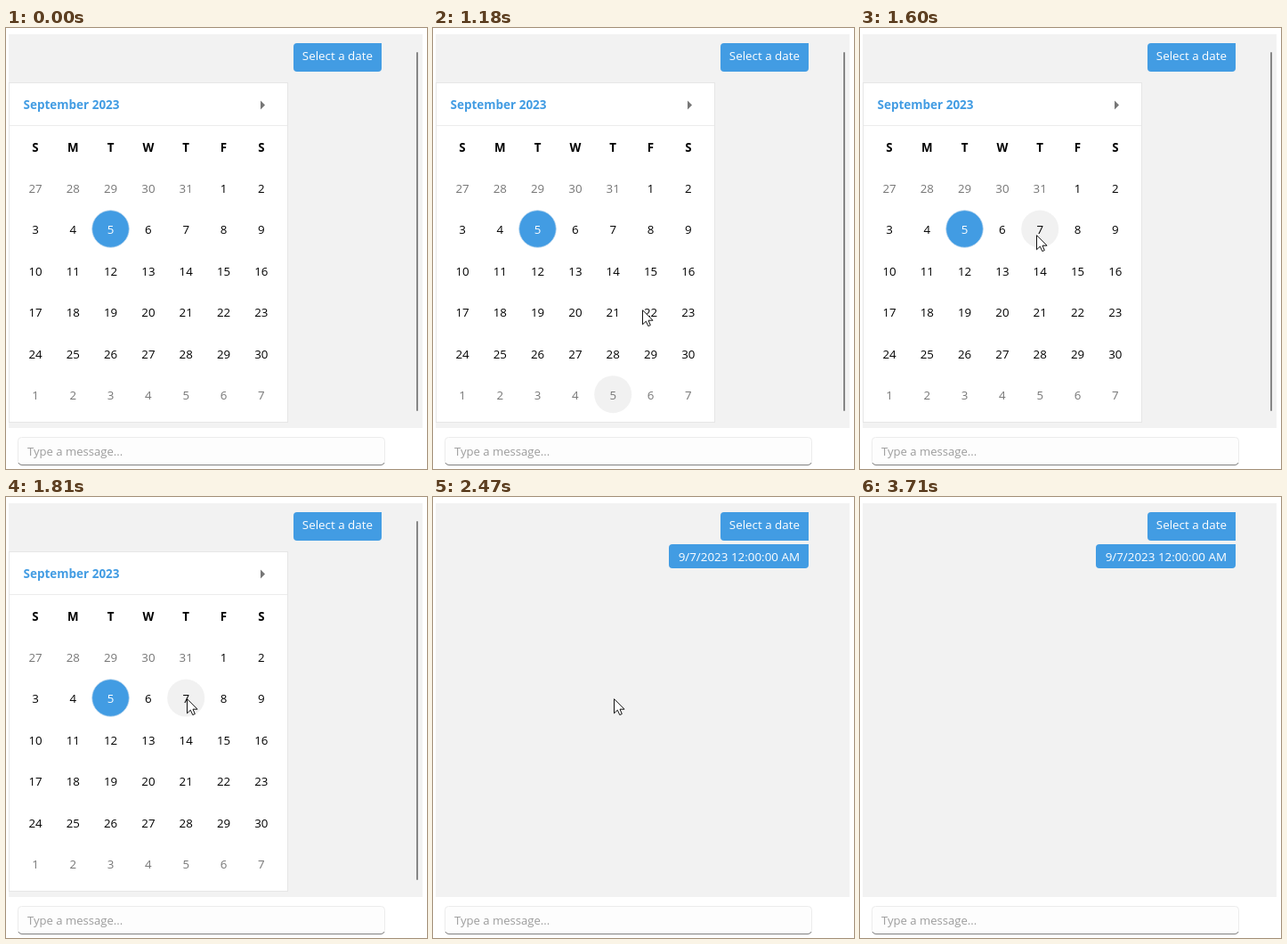
Recreate the animation shown at these times as an HTML page. Size 473 by 495 pixels, loop 5440 ms.

```html
<!DOCTYPE html>
<html lang="en">
<head>
<meta charset="utf-8">
<title>Date picker chat</title>
<style>
html, body { margin: 0; width: 100%; height: 100%; overflow: hidden; background: #fff; }
svg { display: block; width: 473px; height: 495px; }
text { font: 13.4px "Open Sans", "Noto Sans", sans-serif; white-space: pre; }
.bold { font-weight: 700; }
.day { font-size: 13.3px; text-anchor: middle; }
.bubble { fill: #429ce3; }
.said { fill: #fff; text-anchor: end; }
</style>
</head>
<body>
<svg viewBox="0 0 473 495">
  <rect x="3" y="7" width="465" height="442" fill="#f2f2f2"/>
  <path id="first" class="bubble"/>
  <text class="said" x="412" y="36">Select a date</text>

  <g id="picker">
    <rect x="461" y="27" width="2" height="403" rx="1" fill="#868686"/>
    <rect x="3.5" y="61.5" width="313" height="381" fill="#fff" stroke="#e6e6e6"/>
    <path d="M4 109.5H316" stroke="#ececec"/>
    <text class="bold" x="19.5" y="91" fill="#429ce3" style="font-size:13.5px">September 2023</text>
    <path d="M286 81.5L291 86.5L286 91.5Z" fill="#767676"/>
    <circle id="hover" r="21"/>
    <circle cx="117.5" cy="225.5" r="20.8" fill="#429ce3" stroke="#b5d3ec" stroke-width=".8"/>
    <g id="days"></g>
  </g>

  <g id="reply">
    <path id="second" class="bubble"/>
    <text class="said" x="412" y="72">9/7/2023 12:00:00 AM</text>
  </g>

  <rect id="field" x="13.5" y="459.5" width="412" height="31" rx="4" stroke="#ececec"/>
  <path d="M14 488Q15 490.5 18 490.5H421Q424 490.5 425 488" fill="none" stroke="#808080"/>
  <text id="hint" x="24" y="480" style="font-size:13.1px">Type a message...</text>

  <path id="arrow" d="M.5 .7V16.8L4.3 13.2L6.8 18.6L9.3 17.5L7 12.2H12Z" fill="#fff" stroke="#111"/>
  <path id="beam" d="M-3 -7.5H-.5M1.5 -7.5H4M-3 7.5H-.5M1.5 7.5H4M.5 -7V7" fill="none" stroke="#111"/>
</svg>
<script>
const $ = id => document.getElementById(id);
const LOOP = 5440, PICKED = 2470, LEAVE = 3710;
const COL = 42.3, ROW = 46.4;

// Pointer positions, each held until the next: [ms, x, y]
const moves = [
  [910, 161, 481], [980, 174, 456], [1050, 199, 406], [1120, 222, 356],
  [1180, 235, 316], [1250, 233, 285], [1320, 212, 259], [1390, 191, 241],
  [1460, 192, 239], [1530, 195, 236], [1600, 198, 232], [1670, 201, 229],
  [1740, 203, 227], [1810, 203, 226],
  [3360, 205, 232], [3430, 215, 261], [3500, 239, 324], [3570, 275, 404],
  [3640, 307, 475]
];

function bubble(x, y, w, h, corner) {
  return `M${x + 4} ${y}H${x + w}V${y + h - corner}q0 ${corner} ${-corner} ${corner}` +
    `H${x + 4}q-4 0 -4 -4V${y + 4}q0 -4 4 -4Z`;
}

function addDay(label, col, y, fill, style = "") {
  const el = document.createElementNS("http://www.w3.org/2000/svg", "text");
  el.setAttribute("class", "day " + style);
  el.setAttribute("x", 33 + col * COL);
  el.setAttribute("y", y);
  el.setAttribute("fill", fill);
  el.textContent = label;
  $("days").append(el);
}

[..."SMTWTFS"].forEach((name, i) => addDay(name, i, 139, "#000", "bold"));
for (let i = 0; i < 42; i++) {
  const date = new Date(2023, 7, 27 + i);
  const fill = i === 9 ? "#fff" : date.getMonth() === 8 ? "#000" : "#767676";
  addDay(date.getDate(), i % 7, Math.round(185 + Math.floor(i / 7) * ROW), fill);
}
$("second").setAttribute("d", bubble(265, 53, 157, 27, 4));

const show = (id, on) => $(id).style.display = on ? "" : "none";
const paint = (id, color) => $(id).setAttribute("fill", color);

function pointerAt(t) {
  return t < LEAVE ? moves.findLast(m => m[0] <= t) : undefined;
}

function drawHover(t) {
  // The highlight trails the pointer by one step
  const p = pointerAt(t - 70);
  const col = p && Math.round((p[1] - 33) / COL);
  const row = p && Math.round((p[2] - 179.2) / ROW);
  const on = p && row < 6;
  show("hover", on);
  if (!on) return;
  $("hover").setAttribute("cx", 33 + col * COL);
  $("hover").setAttribute("cy", 179.2 + row * ROW);
  paint("hover", t >= 2270 && t < 2340 ? "#eaeaea" : "#f1f1f1");
}

function draw(t) {
  const picked = t >= PICKED;
  show("picker", !picked);
  show("reply", picked);
  $("first").setAttribute("d", bubble(323, 17, 99, 32, picked ? 0 : 4));
  drawHover(t);

  const p = pointerAt(t);
  const typing = p && p[2] > 459;
  show("arrow", p && !typing);
  show("beam", typing);
  if (p) $(typing ? "beam" : "arrow").setAttribute("transform", `translate(${p[1]} ${p[2]})`);

  const lit = typing && picked;
  paint("field", lit ? "#f9f9f9" : "#fdfdfd");
  paint("hint", lit ? "#888" : "#9c9c9c");
}

const start = performance.now();
function tick() {
  draw((performance.now() - start) % LOOP);
  requestAnimationFrame(tick);
}
tick();
</script>
</body>
</html>
```
